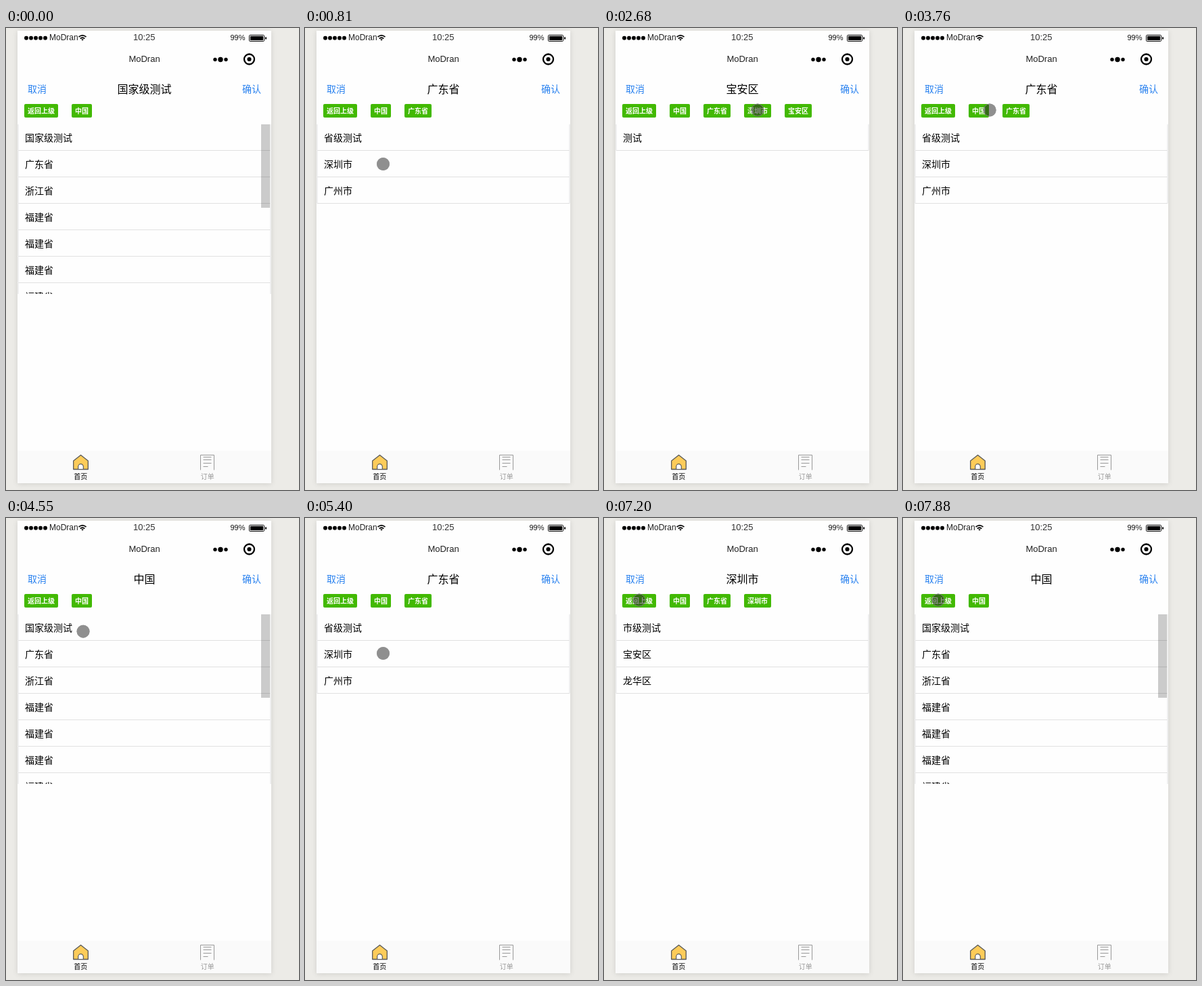
Recreate the animation shown at these times as an HTML page. Size 433 px wide and 681 px high, loop 8000 ms.

```html
<!DOCTYPE html>
<html lang="zh-CN">
<head>
<meta charset="utf-8">
<title>地区选择</title>
<style>
  html, body { margin: 0; width: 100%; height: 100%; overflow: hidden; background: #ecebe7; }
  .phone { position: absolute; left: 17px; top: 4px; width: 375px; height: 667px; background: #fefefe; box-shadow: 0 1px 8px rgba(0, 0, 0, .12); }
  svg { position: absolute; left: 0; top: 0; display: block; }
  text { font-family: "Liberation Sans", "Noto Sans CJK SC", "Noto Sans CJK", sans-serif; fill: #000; }
  .mid { text-anchor: middle; }
  .action { font-size: 14px; fill: #2a82ef; }
  .row { font-size: 14px; }
  .tag rect { fill: #42b902; }
  .tag text { font-size: 10px; font-weight: 700; fill: #fff; }
  .edge { fill: none; stroke: #e1e1e1; }
</style>
</head>
<body>
<div class="phone"></div>
<svg width="433" height="681" viewBox="0 0 433 681">
  <defs><clipPath id="view"><rect x="17" y="142" width="375" height="250"/></clipPath></defs>

  <!-- status bar -->
  <g id="signal"></g>
  <text x="64" y="18" font-size="12" style="fill:#222">MoDran</text>
  <g fill="none" stroke="#000" stroke-width="1.7">
    <path d="M107.5 13.2Q113 8.6 118.5 13.2M109.7 15.6Q113 12.9 116.3 15.6"/>
    <path d="M111.2 16.8Q113 15.6 114.8 16.8L113 18.8Z" fill="#000" stroke="none"/>
  </g>
  <text class="mid" x="204.3" y="18" font-size="13" style="fill:#333">10:25</text>
  <text x="331.5" y="18" font-size="11" style="fill:#111">99%</text>
  <rect x="359.5" y="10.5" width="22" height="9" rx="1" fill="none" stroke="#000"/>
  <rect x="361" y="12" width="19" height="6"/>
  <rect x="383" y="13.5" width="2" height="3"/>

  <!-- navigation -->
  <text class="mid" x="204.5" y="50" font-size="13" style="fill:#222">MoDran</text>
  <circle cx="309" cy="46.5" r="2.7"/>
  <circle cx="317" cy="46.5" r="3.7"/>
  <circle cx="325" cy="46.5" r="2.7"/>
  <circle cx="359.5" cy="46" r="7.5" fill="none" stroke="#000" stroke-width="2.3"/>
  <circle cx="359.5" cy="46" r="3.1"/>

  <!-- picker -->
  <text class="action" x="32" y="95">取消</text>
  <text class="action" x="349" y="95">确认</text>
  <text id="title" class="mid" x="204.5" y="96" font-size="16"></text>
  <g id="tags"></g>
  <g id="lists" clip-path="url(#view)"></g>
  <rect id="bar" x="377" y="142" width="13" height="123" fill="rgba(0,0,0,.2)"/>

  <!-- tab bar -->
  <rect x="17" y="623" width="375" height="48" fill="#fafafa"/>
  <path d="M99.7 638L110.5 629.5L121.3 638V650.5H99.7Z" fill="#fdcc5a" stroke="#5a5a5a" stroke-width="1.3" stroke-linejoin="round"/>
  <path d="M106.7 650.5V646.5A3.8 3.8 0 0 1 114.3 646.5V650.5Z" fill="#fff" stroke="#5a5a5a" stroke-width="1.2"/>
  <text class="mid" x="110.3" y="665" font-size="10">首页</text>
  <path d="M287.5 651.5V629.5H307.5V651.5M291.5 632.5H303.5M291.5 636.5H303.5M291.5 641.5H303.5M291.5 646.5H298.5" fill="none" stroke="#999"/>
  <text class="mid" x="297.7" y="665" font-size="10" style="fill:#999">订单</text>

  <g id="cursor">
    <circle r="9.5" fill="rgba(40,40,40,.52)"/>
    <circle r="9" fill="none" stroke="rgba(145,145,145,.75)"/>
  </g>
</svg>
<script>
const LOOP = 8000, STEP = 75, LIST_DELAY = 80;
const TOP = 142, ROW = 39, RIGHT = 391;
const places = ['中国', '广东省', '深圳市', '宝安区'];
const rows = [
  ['国家级测试', '广东省', '浙江省', '福建省', '福建省', '福建省', '福建省'],
  ['省级测试', '深圳市', '广州市'],
  ['市级测试', '宝安区', '龙华区'],
  ['测试']
];

const byId = id => document.getElementById(id);
const show = (el, on) => el.style.display = on ? '' : 'none';
function add(parent, name, attrs, text) {
  const el = document.createElementNS('http://www.w3.org/2000/svg', name);
  for (const key in attrs) el.setAttribute(key, attrs[key]);
  if (text) el.textContent = text;
  return parent.appendChild(el);
}

for (let i = 0; i < 5; i++) add(byId('signal'), 'circle', { cx: 30 + i * 7, cy: 14.8, r: 3 });

let nextX = 27;
const tags = ['返回上级', ...places].map(name => {
  const el = add(byId('tags'), 'g', { class: 'tag' });
  const x = nextX, width = name.length * 10 + 10;
  add(el, 'rect', { x, y: 112, width, height: 20, rx: 2 });
  add(el, 'text', { x: x + 5, y: 126 }, name);
  nextX += width + 20;
  return { el, mid: x + width / 2 };
});

const lists = rows.map(names => {
  const g = add(byId('lists'), 'g', {});
  names.forEach((name, i) => {
    const y = TOP + i * ROW, end = y + ROW - 0.5;
    add(g, 'path', { class: 'edge', d: `M18 ${y}V${end}H${RIGHT}V${y}` });
    add(g, 'text', { class: 'row', x: 28, y: y + 25 }, name);
  });
  return g;
});

// A row goes one level down, the first tag one level up, any other tag to its own place.
const onRow = (dy = 0) => ({ x: 115.5, y: TOP + ROW * 1.5 + dy, next: n => n + 1 });
const onTag = i => ({ x: tags[i].mid, y: 121, next: n => i ? i - 1 : n - 1 });

const visits = [
  { from: 70, to: 490, spot: onRow(), taps: [730] },
  { from: 970, to: 1050, spot: onRow(3), taps: [1360, 1670] },
  { from: 2060, to: 2680, spot: onTag(3), taps: [2950] },
  { from: 3110, to: 3330, spot: onTag(2), taps: [3450] },
  { from: 3680, to: 3920, spot: onTag(1), taps: [4160] },
  { from: 4460, to: 4780, spot: onRow(-1), taps: [5090, 5470, 5790] },
  { from: 6020, to: 6330, spot: onTag(0), taps: [6720, 7270, 7800] }
];

// The pointer moves in even jumps that slow down towards the spot.
function progress(t, from, to) {
  const count = Math.round((to - from) / STEP);
  const done = Math.floor((t - from) / (to - from) * count + 1e-6) + 1;
  return Math.sin(Math.min(1, done / (count + 1)) * Math.PI / 2);
}

function render(t) {
  let x = 408, y = 808, title = rows[0][0], picked = 0, level = 0;
  for (const { from, to, spot, taps } of visits) {
    if (t < from) break;
    const k = progress(t, from, to);
    x += (spot.x - x) * k;
    y += (spot.y - y) * k;
    for (const tap of taps) {
      if (t < tap) break;
      picked = spot.next(picked);
      title = places[picked];
      if (t >= tap + LIST_DELAY) level = picked;
    }
  }
  byId('title').textContent = title;
  tags.forEach((tag, i) => show(tag.el, i <= level + 1));
  lists.forEach((g, i) => show(g, i === level));
  show(byId('bar'), level === 0);
  show(byId('cursor'), t >= visits[0].from);
  byId('cursor').setAttribute('transform', `translate(${x} ${y})`);
}

const begin = performance.now();
function tick() {
  render((performance.now() - begin) % LOOP);
  requestAnimationFrame(tick);
}
render(0);
requestAnimationFrame(tick);
</script>
</body>
</html>
```
